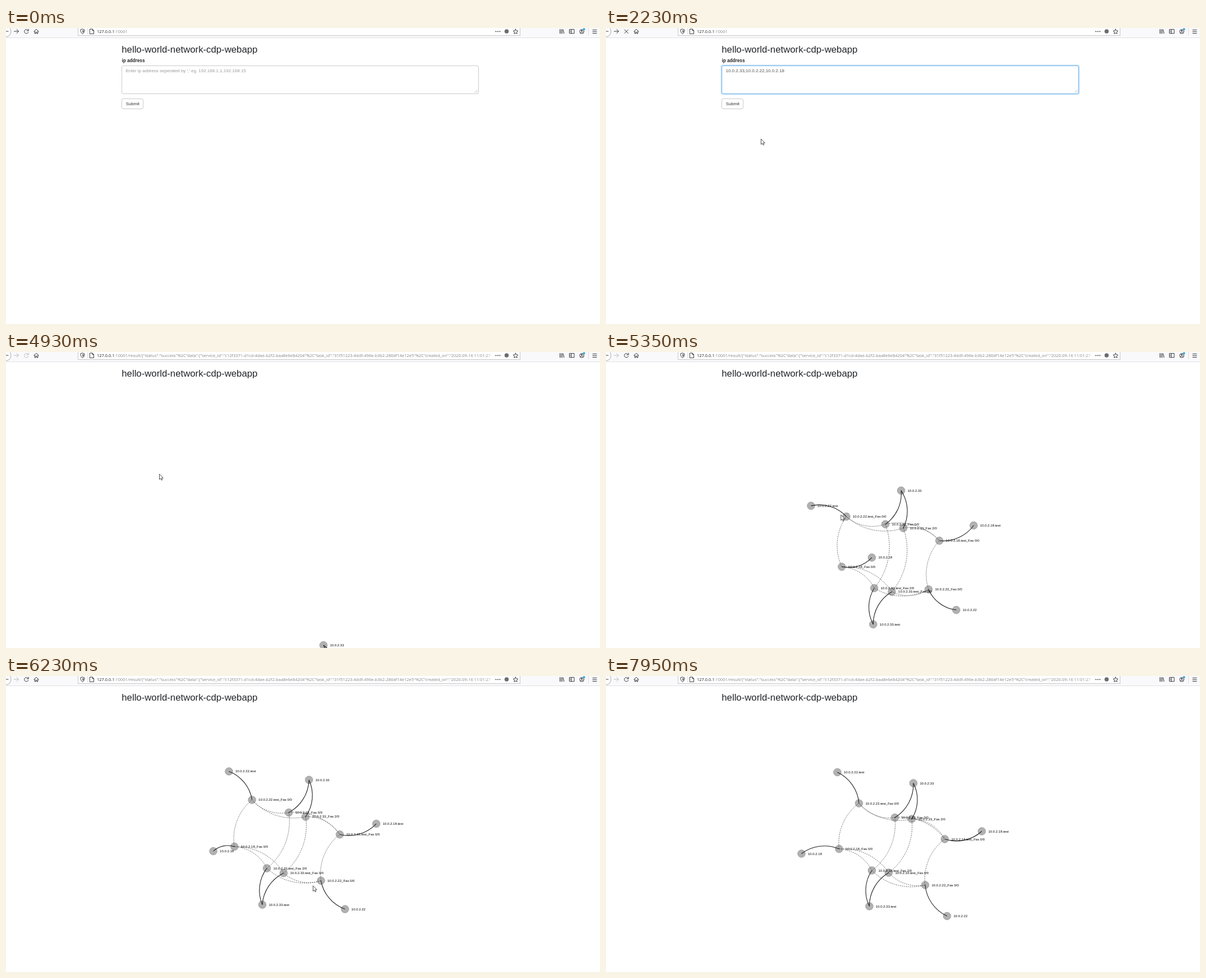
These frames come from a looping animation (1059 px wide and 529 px high, 7990 ms). An HTML page:

```html
<!DOCTYPE html>
<html lang="en">
<head>
<meta charset="utf-8">
<title>hello-world-network-cdp-webapp</title>
<style>
  html, body { margin: 0; width: 100%; height: 100%; overflow: hidden; background: #fff; }
  svg { display: block; width: 1059px; height: 529px; font: 8px "Liberation Sans", Arial, sans-serif; }
  .icon { fill: none; stroke: #3a3a3f; stroke-width: 1; stroke-linecap: round; stroke-linejoin: round; }
  .url { font: 7.45px "Open Sans", "Noto Sans", sans-serif; }
  .node { fill: #b1b1b1; stroke: #999; stroke-width: .8; }
  .solid { fill: none; stroke: #222; stroke-width: 1.1; }
  .dashed { fill: none; stroke: #555; stroke-width: .9; stroke-dasharray: 2 1.6; }
  .label { font-size: 6px; fill: #000; }
  .pointer { fill: #fff; stroke: #222; stroke-width: .8; stroke-linejoin: round; }
</style>
</head>
<body>
<svg viewBox="0 0 1059 529">
  <defs>
    <linearGradient id="fade" gradientUnits="userSpaceOnUse" x1="856" x2="868" y1="0" y2="0">
      <stop stop-color="#fff" stop-opacity="0"/><stop offset="1" stop-color="#fff"/>
    </linearGradient>
    <clipPath id="urlClip"><path d="M160 0H867V14H160Z"/></clipPath>
  </defs>

  <path fill="#f9f9fb" d="M0 0H1059V17H0Z"/>
  <path stroke="#e1e1e3" d="M0 17.5H1059"/>
  <path fill="#fff" stroke="#c6c6c8" d="M128.5 -2V13.5H916.5V-2"/>
  <path stroke="#ddd" d="M145.5 1V12M1038.5 0V13"/>
  <circle cx="-1" cy="6" r="10" fill="#fff" stroke="#aaa"/>
  <g class="icon">
    <path d="M-4 6H4"/>
    <path id="forward" d="M14.5 6H22.5M19 2.5 22.5 6 19 9.5"/>
    <path id="reload" d="M39.3 4A3.7 3.7 0 1 0 39.8 7.5M40.2 2V5H37.2"/>
    <path id="stop" d="M33 3 39.5 9.5M39.5 3 33 9.5"/>
    <path d="M49.7 6.3 54 2.2 58.3 6.3M51.2 5.5V10H53V7.5H55V10H56.8V5.5"/>
    <path d="M136.5 2 140 3.2C140 7 139 9 136.5 10.5 134 9 133 7 133 3.2Z"/>
    <path fill="#3a3a3f" stroke="none" d="M136.5 3.7 138.5 4.4C138.4 6.7 138 7.8 136.5 8.8Z"/>
    <path d="M149.7 2H154L156.5 4.5V10.4H149.7ZM154 2V4.5H156.5"/>
    <path stroke-width="2" d="M873.5 6.3h.01M877 6.3h.01M880.5 6.3h.01"/>
    <path d="M908.5 2 909.8 4.8 912.8 5.2 910.6 7.2 911.2 10.3 908.5 8.8 905.8 10.3 906.4 7.2 904.2 5.2 907.2 4.8Z"/>
    <path d="M987.5 2.5V9.8M989.7 2.5V9.8M991.9 2.5V9.8M993.2 3 995 9.8"/>
    <path d="M1004.8 2.5H1013V9.7H1004.8ZM1008 2.5V9.7M1006 5H1006.7M1006 7H1006.7"/>
    <circle cx="1026.5" cy="6.3" r="3.7"/>
    <path d="M1024 9C1024.5 7 1028.5 7 1029 9"/>
    <circle cx="1026.5" cy="5" r="1.4" fill="#3a3a3f" stroke="none"/>
    <circle cx="1030.5" cy="2.3" r="2" fill="#35a8e0" stroke="none"/>
    <path d="M1046 3.5H1053M1046 6.5H1053M1046 9.5H1053"/>
  </g>
  <circle cx="892.5" cy="6" r="3.7" fill="#6b6b70"/>
  <g clip-path="url(#urlClip)">
    <text class="url" x="162" y="9" fill="#222">127.0.0.1<tspan id="path" fill="#858585"></tspan></text>
    <path fill="url(#fade)" d="M856 1H867V13H856Z"/>
  </g>

  <text x="206.3" y="44" font-size="16.75" fill="#212529">hello-world-network-cdp-webapp</text>

  <g id="form">
    <text x="206.5" y="61.3" font-size="8.2" font-weight="bold" fill="#222">ip address</text>
    <rect id="glow" x="206" y="67" width="637" height="51" rx="3" fill="none" stroke="#66afe9" stroke-opacity=".25" stroke-width="4"/>
    <rect id="field" x="206.5" y="67.5" width="636" height="50" rx="2.5" fill="#fff"/>
    <path stroke="#aaa" stroke-width=".8" d="M835.5 115.5 840.5 110.5M838.5 115.5 840.5 113.5"/>
    <text id="value" x="213.5" y="79.3"></text>
    <rect id="button" x="206.5" y="126.5" width="38" height="18" rx="2.5"/>
    <text x="213.7" y="138.3" font-size="7.8" fill="#333">Submit</text>
  </g>
  <text id="loading" x="206.5" y="61.3" font-size="7.8" fill="#333">loading...</text>

  <g id="graph"></g>

  <g id="cursor">
    <path id="arrow" class="pointer" d="M0 0V9.8L2.2 7.8 3.7 11.1 5.3 10.4 3.9 7.2H6.8Z"/>
    <path id="hand" class="pointer" d="M1 1.2C1-.2 2.8-.2 2.8 1.2V5L6 5.6Q7.3 6 7 7.5L6.2 12.5H1.8L-1.2 8.3C-2 7 -.6 6.4 .2 7.2L1 8Z"/>
    <path id="beam" fill="none" stroke="#222" stroke-width=".9" d="M-2 0H2M0 0V10M-2 10H2"/>
  </g>
</svg>
<script>
const DURATION = 7990;
const RESULT_PATH = ':10001/result/{"status":"success"%2C"data":{"service_id":"c12f3371-d1cd-4dae-b2f2-baa8e6e84204"' +
  '%2C"task_id":"31f51223-4ddf-496e-b3b2-286df14e12e5"%2C"created_on":"2020-09-16 11:01:27"';
const PLACEHOLDER = "Enter ip address seperated by ',' eg. 192.168.1.1,192.168.15";
const ADDRESSES = "10.0.2.33,10.0.2.22,10.0.2.18";

// Label suffix, then x,y when dragged, released and settled
const nodes = [
  ["22.test", 346, 160.5, 413, 173.5, 412.5, 172],
  ["22.test_Fas 0/0", 407.5, 188, 448, 231.5, 451, 227.5],
  ["33", 512.5, 153, 548.5, 195.5, 548, 191.5],
  ["33_Fas 0/0", 476.5, 210.5, 512.5, 254, 515, 253],
  ["33_Fas 2/0", 508, 221.5, 542, 260.5, 545, 255.5],
  ["18.test", 636, 232.5, 667.5, 273.5, 670, 277.5],
  ["18.test_Fas 0/0", 570.5, 252.5, 602.5, 292.5, 604, 291.5],
  ["18", 444.5, 268, 347, 326.5, 348.5, 317.5],
  ["18_Fas 0/0", 388, 278, 413, 313, 415.5, 309],
  ["33.test_Fas 2/0", 442, 324, 472, 349.5, 474, 347.5],
  ["33.test_Fas 0/0", 473, 334.5, 501.5, 357.5, 504, 351.5],
  ["22_Fas 0/0", 540, 338.5, 568, 374, 569, 373.5],
  ["22", 585.5, 382, 610, 427, 608, 429],
  ["33.test", 432, 389.5, 464.5, 414.5, 469.5, 411.5]
];
const solidLinks = [[0, 1], [2, 3], [2, 4], [5, 6], [7, 8], [13, 9], [13, 10], [12, 11]];
const dashedLinks = [[8, 1], [3, 1], [4, 1], [3, 9], [4, 10], [3, 6], [4, 6], [11, 6], [8, 9], [8, 10], [11, 9], [11, 10]];

// time, x, y
const cursorKeys = [
  [50, 1003, 531], [450, 560, 210], [680, 345, 86], [820, 330, 84], [900, 325, 86], [1190, 232, 139],
  [1760, 232, 139], [2460, 298, 227], [2710, 298, 227], [3340, 278, 218], [4200, 278, 218], [4700, 273.5, 218],
  [5000, 273.5, 218], [5740, 580, 372], [5800, 580, 372], [6580, 521, 377], [6700, 519, 376], [7410, 796, 502], [7620, 888, 532]
];

const el = id => document.getElementById(id);
const show = (id, on) => el(id).setAttribute("visibility", on ? "inherit" : "hidden");
const set = (item, attrs) => { for (const key in attrs) item.setAttribute(key, attrs[key]); };
const progress = (t, from, to) => Math.min(1, Math.max(0, (t - from) / (to - from)));
const easeOut = k => 1 - (1 - k) ** 2;
const mix = (a, b, k) => a.map((v, i) => v + (b[i] - v) * k);

function add(tag, className) {
  const item = document.createElementNS("http://www.w3.org/2000/svg", tag);
  item.setAttribute("class", className);
  return el("graph").appendChild(item);
}
const circles = nodes.map(() => add("circle", "node"));
const makeLinks = (list, kind) => list.map(([from, to]) => ({ from, to, item: add("path", kind) }));
const links = [...makeLinks(dashedLinks, "dashed"), ...makeLinks(solidLinks, "solid")];
const labels = nodes.map(([name]) => {
  const label = add("text", "label");
  label.textContent = "10.0.2." + name;
  return label;
});

// The network first surfaces tilted, hanging from its top node
function entryPose(x, y) {
  const [, pivotX, pivotY] = nodes[2], tilt = -28 * Math.PI / 180;
  const dx = x - pivotX, dy = y - pivotY;
  return [566 + dx * Math.cos(tilt) - dy * Math.sin(tilt), 524 + dx * Math.sin(tilt) + dy * Math.cos(tilt)];
}

function nodePosition([, x1, y1, x2, y2, x3, y3], t) {
  if (t < 5750) {
    const [x, y] = mix(entryPose(x1, y1), [x1, y1], easeOut(progress(t, 4960, 5750)));
    return [x, y + 40 * (1 - progress(t, 4800, 4920))];
  }
  if (t < 6700) return mix([x1, y1], [x2, y2], easeOut(progress(t, 5790, 6640)));
  return mix([x2, y2], [x3, y3], easeOut(progress(t, 6700, 7950)));
}

function drawGraph(t) {
  show("graph", t >= 4800);
  const points = nodes.map(node => nodePosition(node, t));
  points.forEach(([x, y], i) => {
    set(circles[i], { cx: x, cy: y, r: 6.8 });
    set(labels[i], { x: x + 11.5, y: y + 2 });
  });
  for (const { from, to, item } of links) {
    const [x1, y1] = points[from], [x2, y2] = points[to];
    const radius = Math.hypot(x2 - x1, y2 - y1);
    set(item, { d: `M${x1} ${y1}A${radius} ${radius} 0 0 1 ${x2} ${y2}` });
  }
}

function drawCursor(t) {
  const next = cursorKeys.findIndex(key => key[0] > t);
  let [, x, y] = cursorKeys.at(-1);
  if (next === 0) [, x, y] = cursorKeys[0];
  else if (next > 0) {
    const before = cursorKeys[next - 1], after = cursorKeys[next];
    [, x, y] = mix(before, after, progress(t, before[0], after[0]));
  }
  const onForm = t < 2300;
  const overButton = onForm && x > 206 && x < 245 && y > 126 && y < 145;
  const overField = onForm && x > 206 && x < 843 && y > 67 && y < 118;
  set(el("cursor"), { transform: `translate(${x} ${y})` });
  show("cursor", t >= 50 && t < 7620);
  show("hand", overButton);
  show("beam", overField);
  show("arrow", !overButton && !overField);
  return overButton;
}

function drawPage(t, hovered) {
  const submitted = t >= 2300, focused = t >= 720, filled = t >= 860;
  const stopping = (t >= 1720 && t < 2530) || (t >= 3740 && t < 4300);
  const reloadIdle = (t >= 2530 && t < 2960) || (t >= 4300 && t < 5300);
  el("path").textContent = submitted ? RESULT_PATH : ":10001";
  set(el("forward"), { stroke: submitted ? "#bbb" : "#3a3a3f" });
  set(el("reload"), { stroke: reloadIdle ? "#bbb" : "#3a3a3f" });
  show("reload", !stopping);
  show("stop", stopping);
  show("form", !submitted);
  show("loading", submitted && t < 4300);
  show("glow", !submitted && focused);
  set(el("field"), { stroke: focused ? "#66afe9" : "#ccc" });
  el("value").textContent = filled ? ADDRESSES : PLACEHOLDER;
  set(el("value"), { fill: filled ? "#555" : "#999" });
  set(el("button"), { fill: hovered ? "#e6e6e6" : "#fff", stroke: hovered ? "#adadad" : "#ccc" });
}

function frame() {
  const t = performance.now() % DURATION;
  drawPage(t, drawCursor(t));
  drawGraph(t);
  requestAnimationFrame(frame);
}
frame();
</script>
</body>
</html>
```
